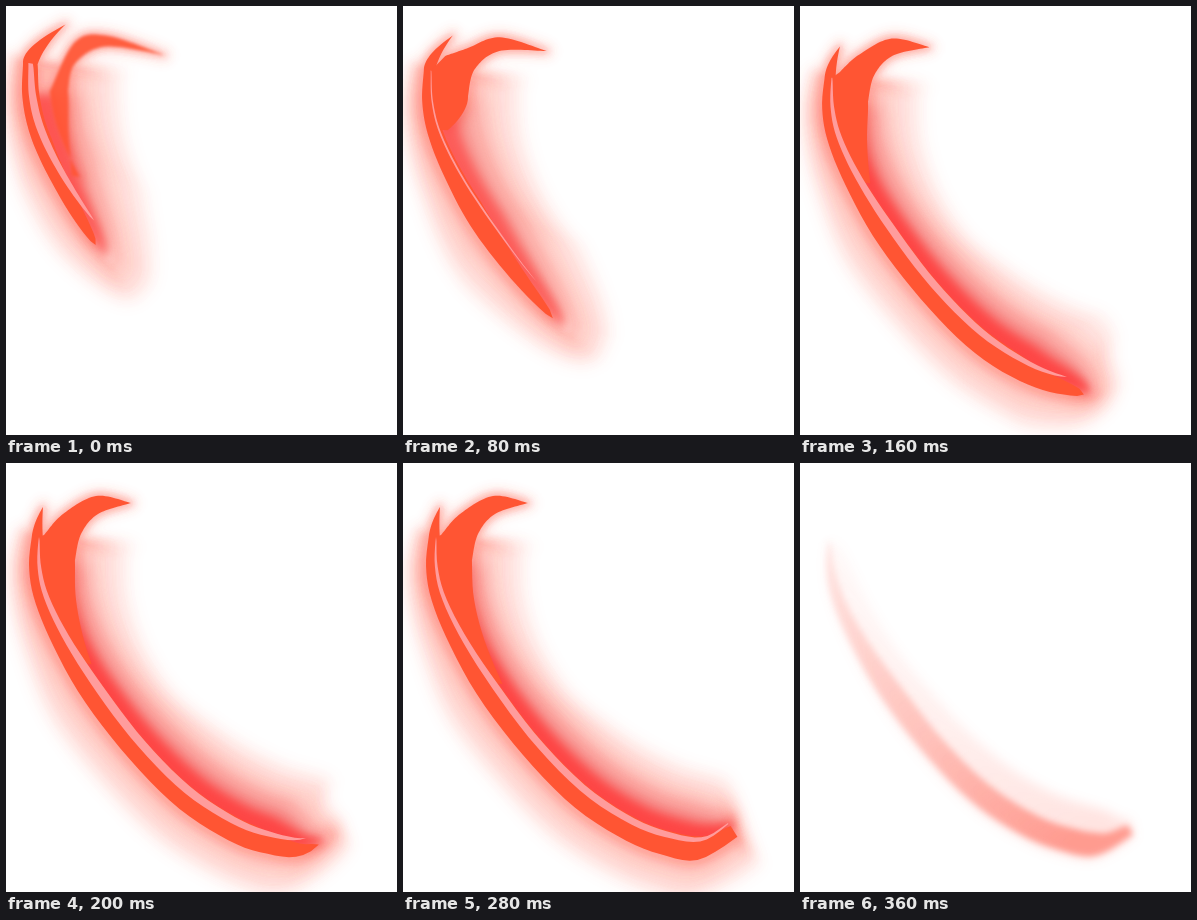
Recreate the animation shown at these times as an HTML page with a canvas. Size 391 by 429 pixels, loop 400 ms.

```html
<!DOCTYPE html>
<html lang="en">
<head>
<meta charset="utf-8">
<title>Slash</title>
<style>
  html, body { margin: 0; width: 100%; height: 100%; overflow: hidden; background: #fff; }
  canvas { display: block; }
</style>
</head>
<body>
<canvas id="stage" width="391" height="429"></canvas>
<script>
const ctx = document.getElementById('stage').getContext('2d');
const STEP = 40;
const ORANGE = '#ff5533', RED = '#ff3b3b', PINK = '#ff9c9c', GLOW = '#f8452f';

// Three rails along the arc, joined rib by rib.
const OUTER = [[26,72],[23,102],[28,135],[45,178],[75,233],[120,292],[170,343],[220,376],[260,392],[296,397],[336,376]];
const SEAM  = [[33,74],[33,102],[40,132],[60,172],[92,220],[134,276],[182,325],[230,357],[267,371],[300,375],[325,360]];
const INNER = [[71,78],[69,100],[74,135],[92,178],[122,224],[160,268],[205,308],[250,335],[288,348],[310,353],[328,351]];

// lift: how far the top is still raised; horn: reach of the upper horn along the arc;
// streak: [from, to, width] of the highlight; shade: strength of the inner red.
const POSES = [
  { lift: 1.5,  head: 4.2,  horn: 3,   streak: [-0.8, 3.9, 0.7],  shade: 0.6, gap: 0.5 },
  { lift: 1.15, head: 4.9,  horn: 2.2, streak: [-0.6, 4.4, 0.4],  shade: 0.6, gap: 0.25 },
  { lift: 0.85, head: 5.5,  horn: 1.9, streak: [-0.4, 5, 0.16],   shade: 0.55 },
  { lift: 0.45, head: 7.5,  horn: 2.6, streak: [-0.2, 6.8, 0.5],  shade: 0.8 },
  { lift: 0.2,  head: 8.6,  horn: 3.1, streak: [-0.1, 8, 0.55],   shade: 0.8 },
  { lift: 0,    head: 9.4,  horn: 3.6, streak: [0, 9, 0.6],       shade: 0.8 },
  { lift: 0,    head: 10.3, horn: 3.8, streak: [0, 9.7, 0.55],    shade: 0.8 },
  { lift: 0,    head: 10.8, horn: 4,   streak: [0, 10.2, 0.5],    shade: 0.8 },
  { lift: 0,    head: 10.8, tail: 1.6, streak: [4.6, 10.2, 0.35], shade: 0.45 },
  { lift: 0,    head: 10.8, tail: 0.2, ghost: true }
];

const clamp = (x, lo, hi) => Math.min(hi, Math.max(lo, x));
const mix = (a, b, t) => [a[0] + (b[0] - a[0]) * t, a[1] + (b[1] - a[1]) * t];

function spline(pts, u) {
  const last = pts.length - 1;
  u = clamp(u, 0, last);
  const i = Math.min(Math.floor(u), last - 1), t = u - i;
  const [a, b, c, d] = [-1, 0, 1, 2].map(k => pts[clamp(i + k, 0, last)]);
  return [0, 1].map(k => b[k] + 0.5 * t * (c[k] - a[k] +
    t * (2 * a[k] - 5 * b[k] + 4 * c[k] - d[k] + t * (3 * (b[k] - c[k]) + d[k] - a[k]))));
}

function range(from, to, fn, n = 48) {
  return Array.from({ length: n + 1 }, (_, i) => fn(from + (to - from) * i / n));
}

const smooth = pts => range(0, pts.length - 1, u => spline(pts, u));
const bend = (a, b, c) => range(0, 1, t => mix(mix(a, b, t), mix(b, c, t), t), 16);

// Point across the arc: side -1 is the outer rail, 0 the seam, 1 the inner rail.
function across(pose, side, u) {
  const raise = pose.lift * clamp(1 - u / 4, 0, 1);
  const [x, y] = mix(spline(SEAM, u), spline(side < 0 ? OUTER : INNER, u), Math.abs(side));
  return [x - 6 * raise, y - 11 * raise];
}

function tapered(pose, side, u, head) {
  const tail = pose.tail || 0;
  let width = Math.sqrt(clamp((head - u) / 2, 0, 1));
  if (tail) width *= Math.sqrt(clamp((u - tail) / 4, 0, 1));
  return mix(across(pose, -0.6, u), across(pose, side, u), width);
}

function band(pose, left, right, head = pose.head, start = 0) {
  const from = Math.max(start, pose.tail || 0), to = Math.min(head, 10);
  return [
    ...range(from, to, u => tapered(pose, right, u, head)),
    ...range(to, from, u => tapered(pose, left, u, head))
  ];
}

function blade(pose) {
  const pts = band(pose, -1, pose.gap ? 0.2 : 0.1);
  if (pose.tail) return pts;
  const L = pose.lift;
  const tip = [37 + 15 * L, 44 - 17 * L];
  const left = pts[pts.length - 1], right = pts[0];
  const before = mix(across(pose, -1, 0.5), left, 2);
  const inside = [mix(tip, right, 0.5)[0] - 1 - 4 * L, mix(tip, right, 0.5)[1]];
  return [...bend(tip, inside, right), ...pts, ...bend(left, before, tip)];
}

function horn(pose) {
  const L = pose.lift, gap = pose.gap || 0, end = pose.horn;
  const notch = mix([38 + 5 * L, 72 - 26 * L], across(pose, gap, 0.9), Math.min(1, gap * 2));
  const point = [125 + 22 * L, 40 + 6 * L];
  const top = smooth([notch, [57 + 8 * L, 51 - 10 * L], [90 + 8 * L, 33 - 2 * L], point]);
  const under = smooth([point, [92 + 5 * L, 51 - 7 * L], [75 - 4 * L, 71 - 9 * L], across(pose, 1, 0.9)]);
  const inner = range(0.9, end, u => across(pose, 1 - 0.75 * ((u - 0.9) / (end - 0.9)) ** 2, u), 16);
  const back = range(end, gap ? 0.9 : 0, u => across(pose, gap, u), 16);
  return [...top, ...under, ...inner, ...back];
}

function streak(pose) {
  const [from, to, width] = pose.streak;
  const swell = u => width * Math.max(0, Math.sin(Math.PI * (u - from) / (to - from))) ** 0.6;
  const start = Math.max(0, from);
  return [
    ...range(start, to, u => across(pose, 0.16 * swell(u), u)),
    ...range(to, start, u => across(pose, -0.5 * swell(u), u))
  ];
}

function fill(shapes, color, alpha = 1, blur = 0, spread = 0) {
  ctx.save();
  ctx.globalAlpha = alpha;
  ctx.fillStyle = ctx.strokeStyle = color;
  ctx.lineJoin = 'round';
  ctx.lineWidth = 2 * spread;
  if (blur) ctx.filter = `blur(${blur}px)`;
  ctx.beginPath();
  for (const pts of shapes) {
    pts.forEach(([x, y], i) => i ? ctx.lineTo(x, y) : ctx.moveTo(x, y));
    ctx.closePath();
  }
  ctx.fill();
  if (spread) ctx.stroke();
  ctx.restore();
}

// Nested bands widen away from the blade and get fainter.
function drawHalo(pose, tops, strength) {
  const LAYERS = 6;
  for (let i = LAYERS; i > 0; i--) {
    const k = i / LAYERS, alpha = strength * (0.035 + 0.04 * (1 - k));
    const ring = band({ ...pose, tail: 0 }, -1 - 1.7 * k, 1 + 1.4 * k, pose.head + 0.3 + 0.6 * k);
    fill([ring, ...tops], GLOW, alpha, 2 + 4 * k, 1 + 8 * k);
  }
}

function drawGhost(pose) {
  const fade = ctx.createLinearGradient(40, 80, 270, 380);
  fade.addColorStop(0, 'rgba(255,75,55,0.15)');
  fade.addColorStop(0.55, 'rgba(255,75,55,0.35)');
  fade.addColorStop(1, 'rgba(255,75,55,0.6)');
  fill([band(pose, -0.95, 1.2)], fade, 0.25, 6);
  fill([band(pose, -0.8, 0.25)], fade, 0.8, 3);
}

function drawPose(pose) {
  ctx.fillStyle = '#fff';
  ctx.fillRect(0, 0, 391, 429);
  if (pose.ghost) return drawGhost(pose);

  const tops = pose.tail ? [] : [horn(pose)];
  const body = blade(pose);
  drawHalo(pose, pose.tail ? [] : [...tops, body], pose.tail ? 0.7 : 1);

  const shade = (side, color, alpha, blur) =>
    fill([band(pose, -0.3, side, pose.head + 0.2, 1)], color, pose.shade * alpha, blur);
  shade(1.4, '#ee3c3a', 0.3, 9);
  shade(0.95, '#ee3c3a', 0.45, 6);
  shade(0.6, RED, 1, 4);

  fill([body], ORANGE);
  fill(tops, ORANGE, pose.gap ? 0.9 : 1, pose.gap ? 1.5 : 0.4);
  fill([streak(pose)], PINK, 1, 0.7);
}

let shown = -1;
function tick() {
  const step = Math.floor(performance.now() / STEP) % POSES.length;
  if (step !== shown) drawPose(POSES[shown = step]);
  requestAnimationFrame(tick);
}
tick();
</script>
</body>
</html>
```
